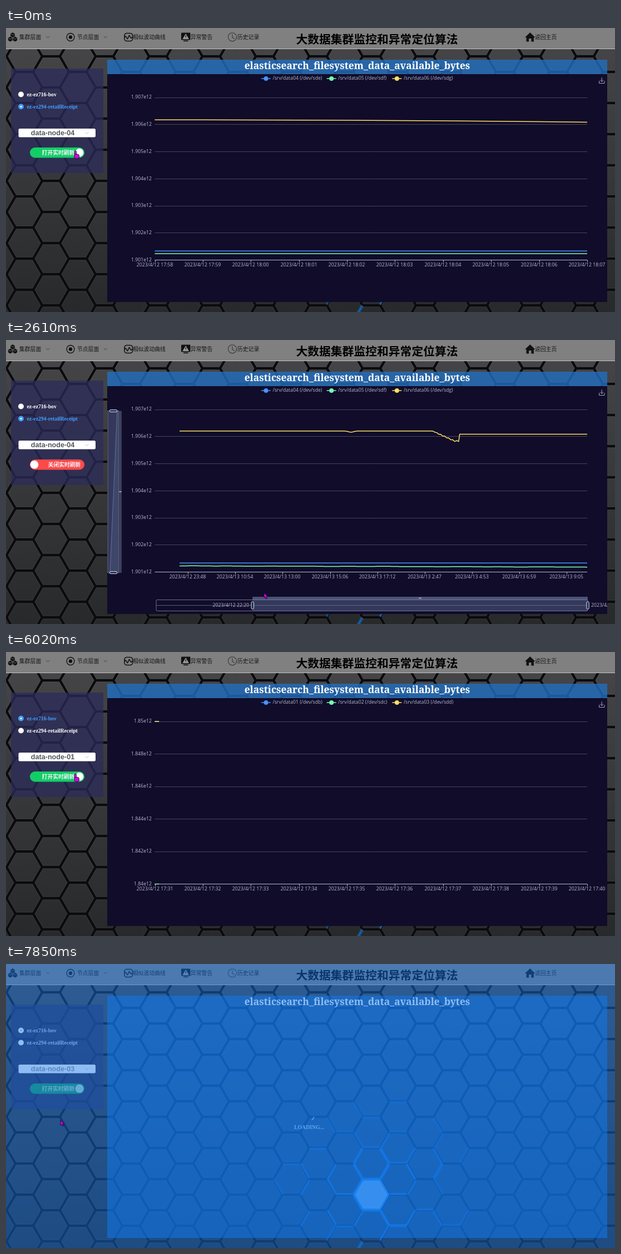
Animation, 1095 px wide and 511 px high, one loop 8000 ms. Source, as an HTML page with a canvas:

```html
<!DOCTYPE html>
<html lang="zh">
<head>
<meta charset="utf-8">
<title>集群监控</title>
<style>
html, body { margin: 0; width: 100%; height: 100%; overflow: hidden; background: #333; }
canvas { display: block; }
</style>
</head>
<body>
<canvas id="stage" width="1095" height="511"></canvas>
<script>
const W = 1095, H = 511, LOOP = 8000, TICK = 135;
const stage = document.getElementById('stage');
let g = stage.getContext('2d');

const SANS = '"Open Sans","Noto Sans",sans-serif';
const SERIF = '"Liberation Serif",serif';
const CJK = '"Noto Sans CJK SC","Noto Sans CJK",sans-serif';
const COLORS = ['#4992ff', '#7cffb2', '#fddd60'];
const [BLUE, GREEN, YELLOW] = COLORS;
const SOFT = '#b9b8ce';
const L = 267.5, R = 1045, T = 125, B = 417.5, LAST = 1440;

// the screen refreshes every TICK inside these spans and rests between them
const SPANS = [[540, 1470], [1620, 2610], [2730, 3650], [3790, 4220],
  [4650, 5630], [5780, 6740], [6890, 7440], [7700, 7700], [7850, 7850]];

// mouse moves: begin, end, goal
const HOME = [124, 221];
const MOVES = [[540, 905, 806, 282], [945, 1080, 608, 283], [1080, 1470, 270, 472],
  [1750, 2610, 464, 455], [2730, 3200, 270, 470], [3200, 3650, 60, 194], [3650, 4220, 55, 119],
  [4650, 4960, 725, 174], [4960, 5190, 461, 366], [5190, 5630, 126, 221],
  [5780, 6740, 88, 190], [6890, 7440, 98, 281]];

const clamp = v => Math.max(0, Math.min(1, v));
const smooth = k => k * k * (3 - 2 * k);
const cubicInOut = k => k < .5 ? 4 * k ** 3 : 1 - 4 * (1 - k) ** 3;
const hash = n => { const s = Math.sin(n * 127.1) * 43758.5453; return s - Math.floor(s); };

function snap(t) {
  const span = SPANS.filter(s => s[0] <= t).pop();
  if (!span) return 0;
  const [a, b] = span;
  return t >= b ? b : a + TICK * Math.floor((t - a) / TICK);
}

function mouse(t) {
  let [x, y] = HOME;
  for (const [a, b, gx, gy] of MOVES) {
    const k = smooth(clamp((t - a) / (b - a)));
    x += (gx - x) * k;
    y += (gy - y) * k;
  }
  return [x, y];
}

// zoom start as dragged with the mouse, seen with a delay
function zoom(t, delay) {
  return t < 1750 || t > 4000 ? 0 : clamp((mouse(Math.max(1620, t - delay))[0] - 270) / 776);
}

function text(s, x, y, size, color, o = {}) {
  g.font = `${o.weight || 400} ${size}px ${o.font || SANS}`;
  g.textAlign = o.align || 'left';
  g.fillStyle = color;
  g.fillText(s, x, y + size * .36);
}
function rect(x, y, w, h, fill, r = 0, stroke, lw = 1) {
  g.beginPath();
  g.roundRect(x, y, w, h, r);
  if (fill) { g.fillStyle = fill; g.fill(); }
  if (stroke) { g.strokeStyle = stroke; g.lineWidth = lw; g.stroke(); }
}
function disc(x, y, r, fill) {
  g.beginPath(); g.arc(x, y, r, 0, 7);
  g.fillStyle = fill; g.fill();
}
function ring(x, y, r, color, w, from = 0, to = 7) {
  g.beginPath(); g.arc(x, y, r, from, to);
  g.strokeStyle = color; g.lineWidth = w; g.stroke();
}
function path(pts, color, w = 1) {
  g.beginPath();
  pts.forEach(p => g.lineTo(p[0], p[1]));
  g.strokeStyle = color; g.lineWidth = w; g.stroke();
}
function poly(pts, fill) {
  g.beginPath();
  pts.forEach(p => g.lineTo(p[0], p[1]));
  g.fillStyle = fill; g.fill();
}
const range = (n, f) => Array.from({ length: n }, (_, i) => f(i));

// ---------- wallpaper ----------
const hexagon = (x, y, r, turn = 0) => range(7, i => {
  const a = i * Math.PI / 3 + turn;
  return [x + r * Math.cos(a), y + r * Math.sin(a)];
});

function makeWallpaper() {
  const c = document.createElement('canvas');
  c.width = W; c.height = H;
  const screen = g;
  g = c.getContext('2d');
  const cells = [];
  for (let i = -14; i < 11; i++)
    for (let j = -8; j < 4; j++) cells.push([657 + i * 48, 415 + j * 56 + (i & 1) * 28]);
  const base = g.createLinearGradient(0, 0, 0, H);
  base.addColorStop(0, '#474749');
  base.addColorStop(1, '#28292b');
  g.fillStyle = base;
  g.fillRect(0, 0, W, H);
  for (const [x, y] of cells) path(hexagon(x, y, 29), 'rgba(140,140,145,.16)', 1);
  for (const [x, y] of cells) path(hexagon(x, y, 32), '#0b0b0d', 4);
  cells.forEach(([x, y], n) => {
    const d = Math.hypot(x - 665, (y - 405) * 1.15);
    if (d > 165) return;
    const h = hexagon(x, y, 31);
    g.globalAlpha = .95 - d / 300;
    for (let e = 0; e < 6; e++)
      if (hash(n * 6 + e) > .3 + d / 320) path([h[e], h[e + 1]], '#1a8cff', 3);
  });
  g.globalAlpha = 1;
  poly(hexagon(657, 415, 30), '#aadcff');
  path(hexagon(657, 415, 31), '#2c9cff', 3);
  g = screen;
  return c;
}
const wallpaper = makeWallpaper();

// ---------- navigation ----------
function chevron(x, y, color) { path([[x - 3, y - 1.5], [x, y + 1.5], [x + 3, y - 1.5]], color, .9); }

function nav() {
  const ink = '#111';
  rect(0, 0, W, 37, '#808080');
  rect(0, 37, W, 1, '#c4c4c4');
  for (let i = 0; i < 3; i++) {
    const a = (i * 4 - 3) * Math.PI / 6, x = 12 + 5 * Math.cos(a), y = 17.5 + 5 * Math.sin(a);
    poly(hexagon(x, y, 4.4, Math.PI / 6), ink);
    path([[x - 3, y - 1.5], [x, y], [x + 3, y - 1.5]], '#888', .7);
  }
  ring(116, 16.5, 7, ink, 1.4);
  disc(116, 16.5, 3.2, ink);
  rect(213, 9.5, 14.5, 14, null, 4, ink, 1.6);
  path(range(15, i => [213 + i, 16.5 - 3.5 * Math.sin(i * .9) * Math.sin(i * Math.PI / 14)]), ink, 1.5);
  rect(315, 8.5, 16.5, 13, ink, 1);
  rect(319, 22.5, 8.5, 1.6, ink);
  poly([[323.2, 10], [329, 20], [317.4, 20]], '#999');
  rect(322.6, 13, 1.3, 4, ink);
  ring(407, 16.3, 7.6, '#333', 1.1);
  path([[407, 11.5], [407, 17], [411, 19.5]], '#333', 1.1);
  poly([[933, 17], [942.3, 8], [951.5, 17]], ink);
  rect(935.6, 16, 4.6, 8.5, ink);
  rect(944.4, 16, 4.6, 8.5, ink);
  rect(940, 16, 5, 3, ink);
  const items = { 集群层面: 24, 节点层面: 128, 相似波动曲线: 228, 异常警告: 332, 历史记录: 416, 返回主页: 951 };
  for (const name in items) text(name, items[name], 16, 9.8, '#151515', { font: CJK });
  chevron(75.5, 16.3, '#333');
  chevron(179, 16.3, '#333');
  text('大数据集群监控和异常定位算法', 667, 20.6, 20.8, '#000', { font: CJK, weight: 700, align: 'center' });
}

// ---------- side panel ----------
function side(s) {
  rect(9, 73, 166, 188, 'rgba(44,43,92,.72)');
  const active = s.load ? '#c3d0e8' : '#409eff', idle = s.load ? '#c3d0e8' : '#fff';
  ['ez-ez716-bov', 'ez-ez294-retailReceipt'].forEach((name, i) => {
    const y = 119.5 + i * 22, on = i === s.cluster;
    disc(27, y, 5, on && !s.load ? active : '#fff');
    if (on) disc(27, y, 1.6, s.load ? '#aab4c8' : '#fff');
    text(name, 37.5, y, 9.7, on ? active : idle, { font: SERIF, weight: 700 });
  });
  rect(22.5, 181, 138.5, 15.5, '#fff', 2.5, s.menu && '#409eff');
  text('data-node-0' + s.node, 84, 188.7, 12.6, s.load ? '#93979f' : '#55575c',
    { font: '"Liberation Sans",sans-serif', weight: 700, align: 'center' });
  chevron(145.5, 189, '#b4b8c0');
  g.globalAlpha = s.load ? .7 : 1;
  rect(43, 215, 98, 18.5, s.live ? '#13ce66' : '#ff4949', 9.2);
  disc(s.live ? 132 : 51, 224.2, 7.4, '#fff');
  text(s.live ? '打开实时刷新' : '关闭实时刷新', s.live ? 94 : 105, 224.3, 9.8, '#f4f4ff',
    { font: CJK, weight: 700, align: 'center' });
  if (s.load) ring(132, 224.2, 3.6, '#9ab', 1);
  g.globalAlpha = 1;
}

function menu(alpha, my) {
  const hover = Math.floor((my - 211) / 23.55);
  g.globalAlpha = alpha;
  poly([[91.5, 201], [96, 205.5], [87, 205.5]], '#fff');
  rect(23, 205.5, 139, 192.5, '#2a506f', 3, '#e6ebf2');
  for (let i = 0; i < 8; i++) {
    const y = 223 + i * 23.55, over = i === hover;
    if (over) rect(24, y - 11.8, 137, 23.5, '#808080');
    text('data-node-0' + (i + 1), 38, y, 11.2, i === 0 ? '#409eff' : over ? GREEN : '#dadde2',
      { font: SERIF, weight: i === 0 ? 700 : 400 });
  }
  rect(155, 208, 4, 50, 'rgba(144,147,153,.45)', 2);
  g.globalAlpha = 1;
}

// ---------- chart ----------
// samples are sorted by their time label as text, hence the jumps
function stamp(i) {
  i = Math.round(i);
  const [day, m] = i < 390 ? [12, 1050 + i] : i < 450 ? [13, i - 390] : i < 901 ? [13, 150 + i] : [13, i - 841];
  return `2023/4/${day} ${Math.floor(m / 60)}:${String(m % 60).padStart(2, '0')}`;
}

const greenY = p => 405.9 + 2.7 * p + .25 * Math.sin(p * 60) * Math.sin(p * 23);
function yellowY(p) {
  if (p < .014) return 186.5 + 220 * p + 1.5 * Math.sin(p * 900);
  if (p < .03) return 163 + 7.5 * Math.sin((p - .014) / .016 * Math.PI / 2);
  if (p > .748) return 169.5;
  const slide = clamp((p - .697) / .043);
  return 163.8 + 2 * Math.exp(-(((p - .537) / .007) ** 2)) + 18 * slide + Math.sin(p * 800) * Math.min(.8, slide * 3);
}
const liveY = k => 165.2 + 4.2 * k * k;
const levels = (s, p) => s.cluster ? [401.2, greenY(p), yellowY(p)] : [T, B, T];

function grid(s) {
  const n = s.cluster ? 6 : 5;
  for (let i = 0; i <= n; i++) {
    const y = T + (B - T) * i / n, row = Math.floor(y) + .5;
    if (i < n) path([[L, row], [R, row]], '#484753');
    const v = s.cluster ? 1.907 - i * .001 : 1.85 - i * .002;
    text(+v.toFixed(3) + 'e12', 262, y - .8, 8.7, SOFT, { align: 'right' });
  }
  path([[L, B], [R, B]], SOFT);
  const mark = (x, label) => {
    x = Math.round(x);
    path([[x + .5, B], [x + .5, B + 3.5]], SOFT);
    text(label, x - .4, 426.3, 8.7, SOFT, { align: 'center' });
  };
  if (s.live) {
    for (let i = 0; i < 10; i++) mark(L + (R - L) * i / 9, stamp(i + (s.cluster ? 28 : 1)));
  } else {
    const first = s.axis * LAST, px = (R - L) / (LAST - first), step = Math.floor(85.5 / px);
    for (let i = Math.ceil(first / step) * step; i <= LAST; i += step) mark(L + (i - first) * px, stamp(i));
  }
}

function lines(s) {
  const X = p => R - (1 - p) / (1 - s.lag) * (R - L);
  const left = Math.max(L, X(s.axis)) - .5;
  const curve = (n, f, color) => path(range(n + 1, i => [X(i / n), f(i / n)]), color, 1.5);
  g.save();
  g.beginPath();
  g.rect(left, 100, Math.max(0, L + (R - L) * s.reveal - left), 330);
  g.clip();
  g.lineJoin = 'round';
  COLORS.forEach((c, i) => {
    if (s.live && s.cluster && i === 2) curve(9, liveY, c);
    else curve(s.live ? 1 : 500, p => levels(s, s.live ? .1 : p)[i], c);
  });
  g.restore();
}

function grip(x, y) { for (let i = -1; i < 2; i++) rect(x + i * 1.6 - .5, y - 1, 1, 2, '#c5cae0'); }

function sliders(s) {
  const fill = 'rgba(135,163,206,.3)', bar = '#3c3f5a', edge = '#71708a', knob = '#2c3358', hand = '#d5d9ea';
  rect(183, 127.5, 20, 291.5, fill, 0, edge);
  rect(203, 127.5, 5, 291.5, bar);
  poly([[187, 419], [200, 127], [203, 127], [203, 419]], 'rgba(135,163,206,.12)');
  path([[187, 419], [200, 127]], '#6c7fa5', .8);
  for (const y of [125.5, 416.5]) rect(186.5, y, 13, 4, knob, 1.5, hand);
  grip(205.5, 273);

  const x = 270 + 776 * s.handle;
  rect(270, 467.5, 776, 20, null, 2, edge);
  rect(x, 467.5, 1046 - x, 20, fill);
  rect(x, 462, 1046 - x, 5, s.drag ? '#4c5378' : bar);
  path([[270, 477.5], [1046, 477.5]], '#65708f', .8);
  for (const hx of [x, 1046]) rect(hx - 2.2, 471, 4.5, 13, knob, 1.5, hand);
  grip((x + 1046) / 2, 464.5);
  if (s.drag) {
    g.save();
    g.beginPath(); g.rect(182, 57, 899, 436); g.clip();
    text(stamp(s.axis * LAST), x - 6, 477, 8.7, SOFT, { align: 'right' });
    text(stamp(LAST), 1052, 477, 8.7, SOFT);
    g.restore();
  }
}

// the box trails the mouse by one refresh, the axis line a little more
function tooltip(s, names) {
  const [mx, my] = mouse(s.t - TICK);
  if (s.live || mx < L || mx > R || my < T || my > B) return;
  const x = mx + 20, y = my + 20;
  const i = Math.round(clamp((mouse(s.t - 195)[0] - L) / (R - L)) * LAST);
  const ys = levels(s, i / LAST), px = Math.round(L + (R - L) * i / LAST) - .5;
  const value = v => s.cluster ? 1901 + (B - v) / 48.75 : 1840 + (B - v) / (B - T) * 10;
  g.setLineDash([3, 2]);
  path([[px, T], [px, B]], '#8a89a0');
  g.setLineDash([]);
  ys.forEach((v, k) => disc(px, v, 2.5, COLORS[k]));
  rect(x, y, 235, 75, '#fff', 3);
  text(stamp(i), x + 117.5, y + 12, 10.2, '#666', { align: 'center' });
  names.forEach((name, k) => {
    const ry = y + 29 + k * 16.8, bytes = Math.floor(value(ys[k]) * 100 + .5) * 1e7;
    disc(x + 11.5, ry + .3, 3.6, COLORS[k]);
    text(name, x + 19, ry, 10.2, '#666');
    text(bytes.toLocaleString('en-US'), x + 227, ry, 10.3, '#555', { align: 'right', weight: 700 });
  });
}

function heading() {
  text('elasticsearch_filesystem_data_available_bytes', 631.5, 67.5, 17.45, '#fff',
    { font: '"Noto Serif",serif', weight: 700, align: 'center' });
}

function chart(s) {
  rect(182, 57, 899, 26, 'rgba(34,110,190,.8)');
  rect(182, 83, 899, 410, '#100c2a');
  heading();
  const names = range(3, i => `/srv/data0${i + (s.cluster ? 4 : 1)} (/dev/sd${'bcdefg'[i + s.cluster * 3]})`);
  names.forEach((name, i) => {
    const x = 459 + i * 117.7;
    path([[x, 91], [x + 17, 91]], COLORS[i], 1.5);
    disc(x + 8.5, 91, 4, COLORS[i]);
    text(name, x + 20.5, 90, 8.7, SOFT);
  });
  path([[1066.5, 95], [1066.5, 99.5], [1076, 99.5], [1076, 95]], SOFT, .9);
  path([[1071.2, 89], [1071.2, 96.5]], SOFT, .9);
  chevron(1071.2, 95, SOFT);
  grid(s);
  lines(s);
  if (!s.live) sliders(s);
  tooltip(s, names);
}

// ---------- pointer and loading ----------
function pointer(x, y, hand) {
  if (hand) {
    rect(x - .5, y, 3, 9, '#d400e0', 1.5, '#1a0020', .8);
    rect(x - 1, y + 6, 8.5, 8, '#d400e0', 3, '#1a0020', .8);
    return;
  }
  const pts = [[0, 0], [0, 9], [2, 7.3], [3.8, 11], [5.4, 10.2], [3.8, 6.8], [6.4, 6.6], [0, 0]]
    .map(p => [x + p[0], y + p[1]]);
  poly(pts, '#d400e0');
  path(pts, '#1a0020', .8);
}

function loading(k) {
  rect(0, 0, W, H, `rgba(17,116,230,${.47 * k})`);
  g.globalAlpha = k;
  ring(545, 273, 9, '#7ab4f5', 1.1, .2, 1);
  text('LOADING...', 545, 293, 9.8, '#5fa5f3', { font: SERIF, weight: 700, align: 'center' });
  g.globalAlpha = 1;
}

function draw(time) {
  const t = snap(time), [mx, my] = mouse(t);
  const s = { t, live: t < 540 || t >= 5780, cluster: +(t < 4650), load: t >= 7700 };
  s.node = s.load ? 3 : s.cluster ? 4 : 1;
  s.menu = t >= 6890 && !s.load;
  s.handle = zoom(t, 175);
  s.axis = zoom(t, 243);
  s.lag = zoom(t, 367);
  s.drag = my > 440;
  const start = [5780, 4650, 540].find(a => t >= a) ?? -1000;
  s.reveal = cubicInOut(clamp((t - start) / 1000));

  g.drawImage(wallpaper, 0, 0);
  nav();
  side(s);
  if (s.load) {
    const k = t < 7850 ? .45 : 1;
    rect(182, 57, 899, 436, `rgba(17,124,240,${.54 * k})`);
    heading();
    if (k < 1) menu(.5, my);
    loading(k);
  } else {
    chart(s);
    if (s.menu) menu(t < 7000 ? .6 : 1, my);
  }
  pointer(mx, my, mx < 175 && !s.load);
}

function frame(now) {
  draw(now % LOOP);
  requestAnimationFrame(frame);
}
draw(0);
requestAnimationFrame(frame);
</script>
</body>
</html>
```
